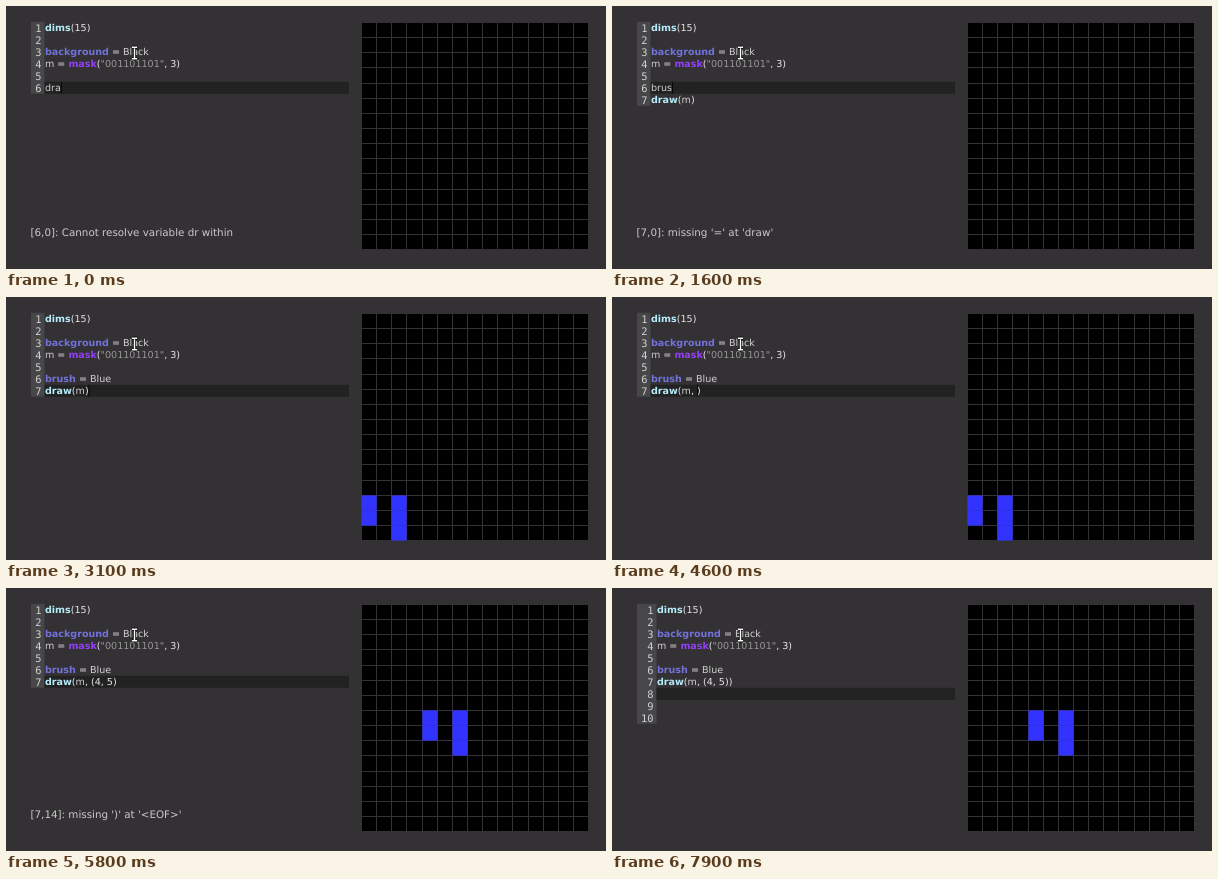
An HTML page with a canvas that plays this animation: 600x263 px, repeating every 8 s.

```html
<!DOCTYPE html>
<html lang="en">
<head>
<meta charset="utf-8">
<style>
  html, body { margin: 0; width: 100%; height: 100%; overflow: hidden; background: #333133; }
  canvas { display: block; }
</style>
</head>
<body>
<canvas id="stage" width="600" height="263"></canvas>
<script>
const ctx = document.getElementById('stage').getContext('2d');
ctx.textRendering = 'geometricPrecision';
const LOOP = 8000, BG = '#333133', FAMILY = '"DejaVu Sans", sans-serif';
const EDITOR = { left: 25, top: 15.8, right: 343, line: 12, size: 9.57 };
const GRID = { left: 355.4, top: 16.4, cell: 15.15, count: 15 };

const HEAD = ['dims(15)', '', 'background = Black', 'm = mask("001101101", 3)', ''];
const KEYWORDS = { dims: '#b5ecfb', draw: '#b5ecfb', background: '#7272da', brush: '#7272da', mask: '#9140f5' };
const MASK = '001101101';

const HOLE = { x: 0, y: 0, color: BG };
const CORNER = { x: 0, y: 0, color: '#3333ff' };
const MOVED = { x: 4, y: 5, color: '#3333ff' };

const missing = (row, col, mark = ')', at = '<EOF>') => `[${row},${col}]: missing '${mark}' at '${at}'`;
const unresolved = name => `[6,0]: Cannot resolve variable ${name} within scope`;

// Each step overrides part of the state; the caret shows unless a step hides it.
const steps = [];
const at = (time, change) => steps.push({ time, change });
const type = (times, before, typed, after, makeTail) => times.forEach((time, i) =>
  at(time, { tail: makeTail(before + typed.slice(0, i + 1) + after), col: before.length + i + 1 }));

// draw(m)
at(0, { tail: ['dra'], row: 6, col: 3, status: unresolved('dr'), shape: null });
type([100, 200, 400, 600], 'dra', 'w(m)', '', text => [text]);
at(100, { status: unresolved('dra') });
at(200, { status: "[6,4]: mismatched input '<EOF>' expecting '('" });
at(500, { status: missing(6, 6) });
at(700, { status: '', shape: HOLE });
at(1000, { col: 0, hidden: true });

// brush = Blue
const withDraw = text => [text, 'draw(m)'];
at(1200, { tail: withDraw(''), col: 0 });
type([1300, 1400, 1500, 1600, 1700, 1800, 1900, 2100, 2300, 2400, 2500, 2600], '', 'brush = Blue', '', withDraw);
at(1400, { status: missing(7, 0, '=', 'draw'), shape: null });
at(2000, { status: "[6,0]: Cannot set 'brush' to anything but a color", shape: HOLE });
at(2400, { status: unresolved('B') });
at(2500, { status: unresolved('Bl') });
at(2600, { status: '', shape: CORNER });
at(2900, { hidden: true });

// draw(m, (4, 5)
const withBrush = text => ['brush = Blue', text];
at(3100, { row: 7, col: 7 });
at(3300, { col: 6 });
at(3600, { hidden: true });
at(3800, {});
type([4000, 4500, 4700, 5000, 5100, 5200, 5300], 'draw(m', ', (4, 5', ')', withBrush);
at(4800, { status: "[7,9]: mismatched input ')' expecting", shape: null });
at(5000, { status: missing(7, 11) });
at(5100, { status: missing(7, 12) });
at(5200, { status: missing(7, 13) });
at(5300, { status: missing(7, 14), shape: MOVED });
at(5500, { col: 14 });
at(5800, { hidden: true });

// Closing bracket and blank lines
const open = withBrush('draw(m, (4, 5)'), closed = withBrush('draw(m, (4, 5))');
at(6000, { tail: [...open, ''], row: 8, col: 0 });
at(6100, { status: missing(8, 0) });
at(6500, { row: 7, col: 14 });
at(6800, { tail: [...closed, ''], col: 15 });
at(6900, { status: '' });
at(7000, { row: 8, col: 0 });
at(7200, { tail: [...closed, '', ''], row: 9 });
at(7400, { tail: [...closed, '', '', ''], row: 10 });
at(7500, { row: 9 });
at(7900, { row: 8, hidden: true });
steps.sort((a, b) => a.time - b.time);

function stateAt(time) {
  const state = {};
  for (const step of steps) {
    if (step.time > time) break;
    Object.assign(state, { hidden: false }, step.change);
  }
  return state;
}

function rect(color, x, y, w, h) {
  ctx.fillStyle = color;
  ctx.fillRect(x, y, w, h);
}

// Draws highlighted code and returns the x position after it.
function drawCode(code, x, y) {
  for (const token of code.match(/\w+|"[^"]*"?|[^\w"]/g) || []) {
    const keyword = KEYWORDS[token];
    ctx.font = `${keyword ? 'bold ' : ''}${EDITOR.size}px ${FAMILY}`;
    ctx.fillStyle = keyword || (token[0] === '"' ? '#979697' : /[a-z]/i.test(token) ? '#d2d1d2' : '#e8e7e8');
    ctx.fillText(token, x, y);
    x += ctx.measureText(token).width;
  }
  return x;
}

function codeWidth(line, col) {
  ctx.save();
  ctx.globalAlpha = 0;
  const width = drawCode(line.slice(0, col), 0, 0);
  ctx.restore();
  return width;
}

function drawEditor({ tail, row, col, hidden }) {
  const lines = [...HEAD, ...tail];
  const { left, top, right, line } = EDITOR;
  const textX = lines.length > 9 ? 45 : 39;
  const rowTop = top + (row - 1) * line;

  rect('#474648', left, top, textX - 0.5 - left, lines.length * line);
  rect('#232223', textX - 0.5, rowTop, right - textX + 0.5, line);
  lines.forEach((text, i) => {
    const y = top + i * line;
    ctx.font = '10.4px "DejaVu Sans Mono", monospace';
    ctx.fillStyle = '#d2d1d2';
    ctx.textAlign = 'right';
    ctx.fillText(i + 1, textX - 3.6, y + 10.2);
    ctx.textAlign = 'left';
    drawCode(text, textX, y + 9.2);
  });
  if (!hidden) rect('#000', textX + codeWidth(lines[row - 1], col), rowTop, 0.8, line);
}

function drawGrid(shape) {
  const { left, top, cell, count } = GRID;
  const edgeX = i => Math.floor(left + i * cell);
  const edgeY = i => Math.floor(top + i * cell);
  // Lines are one pixel wide; overlap extends a cell across the lines around it.
  const fillCell = (col, row, color, overlap = 0) => rect(color,
    edgeX(col) + 1 - overlap, edgeY(row) + 1 - overlap,
    edgeX(col + 1) - edgeX(col) - 1 + 2 * overlap, edgeY(row + 1) - edgeY(row) - 1 + 2 * overlap);

  for (let i = 0; i < count * count; i++) fillCell(i % count, Math.floor(i / count), '#000');
  if (!shape) return;
  [...MASK].forEach((bit, i) => {
    if (bit === '0') return;
    const col = shape.x + i % 3, row = count - 1 - shape.y - Math.floor(i / 3);
    fillCell(col, row, shape.color, shape === HOLE ? 0 : 0.6);
  });
}

function drawPointer() {
  const beam = new Path2D('M126 41.2h1.8l.7.7.7-.7h1.8M128.5 41.6v10.8M126 52.8h1.8l.7-.7.7.7h1.8');
  for (const [color, width] of [['#000', 3], ['#fff', 1.5]]) {
    ctx.strokeStyle = color;
    ctx.lineWidth = width;
    ctx.stroke(beam);
  }
}

function render(now) {
  const state = stateAt(now % LOOP);
  rect(BG, 0, 0, 600, 263);
  drawEditor(state);
  drawGrid(state.shape);
  ctx.font = `10.34px ${FAMILY}`;
  ctx.fillStyle = '#cbcacb';
  ctx.fillText(state.status.slice(0, 40), 24.5, 229.8);
  drawPointer();
}

const start = performance.now();
function frame() {
  render(performance.now() - start);
  requestAnimationFrame(frame);
}
frame();
</script>
</body>
</html>
```
